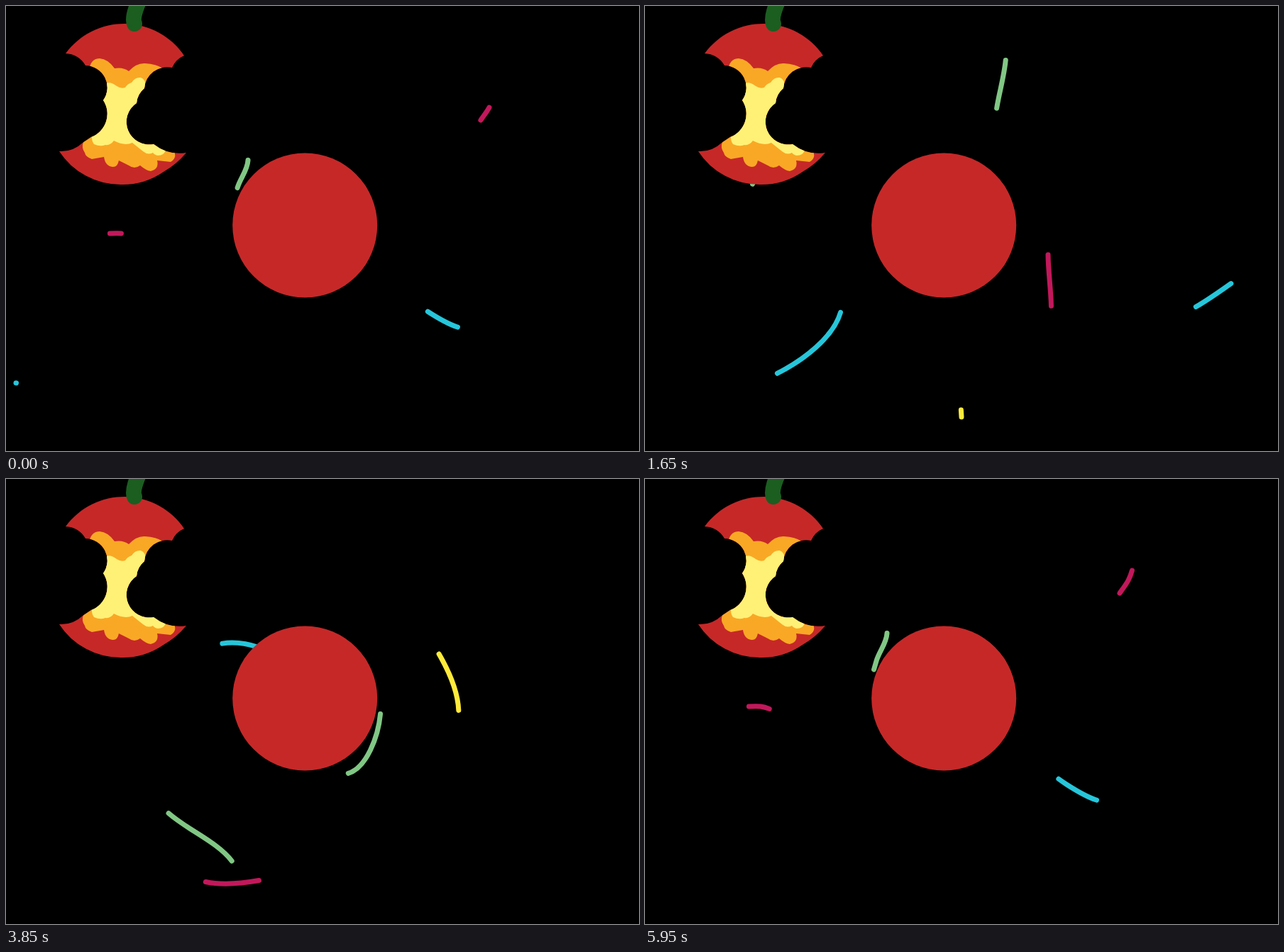
These frames come from a looping animation (892 by 628 pixels, 6000 ms). An HTML page:

```html
<!DOCTYPE html>
<html lang="en">
<head>
<meta charset="utf-8">
<title>Worms</title>
<style>
  html, body { margin: 0; width: 100%; height: 100%; overflow: hidden; background: #000; }
  svg { display: block; width: 100%; height: 100%; }
  #worms path { fill: none; stroke-width: 7; stroke-linecap: round; }
</style>
</head>
<body>
<svg viewBox="0 0 892 628">
  <defs>
    <clipPath id="core">
      <path d="M84,67 A102,102 0 0 1 251,70
        A32,32 0 0 0 234,87 A32,32 0 0 0 195,116 A31,31 0 0 0 184,137 A32,32 0 0 0 208,195 A59,59 0 0 0 254,207
        Q241,223 222,234 A102,102 0 0 1 162,252 A103,103 0 0 1 75,205
        A44,44 0 0 0 108,193 L120,185 A35,35 0 0 0 137,133 A31,31 0 0 0 112,84 A33,33 0 0 0 84,67Z"/>
    </clipPath>
  </defs>
  <rect width="892" height="628"/>
  <g id="worms"></g>
  <circle cx="421.2" cy="309.5" r="102" fill="#c62828"/>
  <ellipse cx="164" cy="138" rx="100" ry="112"/>
  <g clip-path="url(#core)">
    <rect x="70" y="20" width="190" height="236" fill="#c62828"/>
    <path fill="#f9a825" d="M112,90 L118,86 Q121,74 132,74 Q144,75 153,88 Q165,86 173,92 Q184,80 196,81
      Q212,82 221,88 L221,110 L236,203 Q242,214 232,220 L213,218 Q216,230 204,233 Q197,232 189,225
      Q181,231 173,225 L159,218 Q157,228 150,227 Q140,226 138,213 L121,216 Q112,213 111,207 Q106,200 109,192Z"/>
    <path fill="#fff176" d="M136,112 Q145,104 156,113 Q162,117 168,115 Q171,110 177,108 Q182,100 190,101
      Q196,103 197,112 L210,190 L225,203 Q223,211 214,211 Q209,210 207,207 Q200,211 193,205 L178,193
      Q167,198 152,190 Q147,197 140,196 Q133,199 124,195 Q120,190 121,180Z"/>
  </g>
  <path d="M181,25 Q177,17 187,-6" fill="none" stroke="#1b5e20" stroke-width="22" stroke-linecap="round"/>
</svg>
<script>
const LOOP = 6000, TICK = 50, STRIDE = 450, DOT = 0.5;
const layer = document.getElementById('worms');

// Each pose is [time, tail x, tail y, head x, head y]; without a head the worm is a dot.
const worms = [
  { color: '#26c6da', end: 8400, poses: [
    [0, 14, 532], [950, 84, 540, 168, 527], [2350, 275, 401, 234, 350], [3200, 233, 268, 289, 236],
    [5300, 505, 347, 559, 404], [6000, 594, 431, 636, 453], [6950, 699, 458, 740, 443], [8350, 880, 354]] },
  { color: '#c2185b', end: 13300, poses: [
    [5000, 662, 19], [5300, 662, 19, 677, 47], [6000, 681, 143, 669, 161], [6950, 603, 262, 581, 292],
    [8350, 550, 492, 539, 501], [9200, 431, 551, 409, 556], [10500, 247, 553, 215, 518],
    [11300, 204, 407, 216, 384], [12000, 163, 321, 147, 321], [12950, 62, 363, 24, 363], [13300, 5, 361]] },
  { color: '#ffeb3b', end: 5900, poses: [
    [1600, 446, 580], [2350, 442, 511, 442, 487], [3200, 577, 388, 618, 372], [4500, 576, 199, 553, 177],
    [5300, 407, 119, 368, 87], [5900, 232, 72, 180, 70]] },
  { color: '#81c784', end: 10850, poses: [
    [700, 503, 23], [950, 503, 23, 508, 49], [2350, 494, 156, 489, 208], [3200, 508, 260, 528, 324],
    [4500, 469, 416, 425, 380], [5300, 340, 362, 317, 317], [6000, 326, 257, 341, 218],
    [6950, 255, 150, 200, 150], [8350, 157, 238, 132, 324], [9200, 161, 403, 224, 467],
    [10500, 330, 568, 325, 614], [10800, 325, 614]] }
];

const clamp = v => Math.min(1, Math.max(0, v));
const mix = (a, b, k) => a + (b - a) * k;
const distance = (p, q) => Math.hypot(q[0] - p[0], q[1] - p[1]);

// Direction of the trail at point i; the shorter neighbouring segment weighs more.
function tangent(points, i) {
  let x = 0, y = 0;
  for (const [p, q] of [[points[i - 1], points[i]], [points[i], points[i + 1]]]) {
    if (!p || !q) continue;
    const weight = 1 / (distance(p, q) ** 2 || 1);
    x += (q[0] - p[0]) * weight;
    y += (q[1] - p[1]) * weight;
  }
  const size = Math.hypot(x, y) || 1;
  return [x / size, y / size];
}

// Joins all poses into one smooth trail and notes how far along it each pose lies.
function layTrail(worm) {
  const path = document.createElementNS('http://www.w3.org/2000/svg', 'path');
  path.setAttribute('stroke', worm.color);
  const points = worm.poses.flatMap(([, ...xy]) => xy.length > 2 ? [xy.slice(0, 2), xy.slice(2)] : [xy]);
  const lengths = [0];
  let d = `M${points[0]}`;
  for (let i = 1; i < points.length; i++) {
    const p = points[i - 1], q = points[i];
    const u = tangent(points, i - 1), v = tangent(points, i);
    const reach = distance(p, q) / 3;
    d += `C${p[0] + u[0] * reach},${p[1] + u[1] * reach} ${q[0] - v[0] * reach},${q[1] - v[1] * reach} ${q}`;
    path.setAttribute('d', d);
    lengths.push(path.getTotalLength());
  }
  worm.total = lengths.at(-1);
  worm.keys = worm.poses.map(pose => {
    const tail = lengths.shift();
    return { time: pose[0], tail, head: pose.length > 3 ? lengths.shift() : tail };
  });
  // A life may span several loops, so several of the same kind can be alive at once.
  worm.copies = Array.from({ length: Math.ceil(worm.end / LOOP) }, () => path.cloneNode());
  layer.append(...worm.copies);
}

// In every stride the head stretches forward first, then the tail catches up.
function crawl(keys, age) {
  const i = Math.max(1, keys.findIndex(key => age < key.time));
  const [from, to] = age < keys.at(-1).time ? [keys[i - 1], keys[i]] : keys.slice(-2);
  const span = to.time - from.time;
  const strides = Math.max(1, Math.round(span / STRIDE));
  const progress = clamp((age - from.time) / span) * strides;
  const done = Math.floor(progress), part = progress - done;
  const lead = (done + clamp(part * 1.6)) / strides;
  const lag = (done + clamp(part * 1.6 - 0.6)) / strides;
  return [mix(from.tail, to.tail, lag), mix(from.head, to.head, lead)];
}

function draw(time) {
  for (const { keys, copies, end, total } of worms) {
    copies.forEach((path, k) => {
      const age = time + k * LOOP;
      const alive = age >= keys[0].time && age < end;
      path.style.display = alive ? '' : 'none';
      if (!alive) return;
      const [tail, head] = crawl(keys, age);
      const from = Math.min(tail, total - DOT);
      path.setAttribute('stroke-dasharray', `${Math.max(DOT, head - from)} 9999`);
      path.setAttribute('stroke-dashoffset', -from);
    });
  }
}

worms.forEach(layTrail);
const start = performance.now();
function frame() {
  const time = (performance.now() - start) % LOOP;
  draw(Math.floor(time / TICK) * TICK);
  requestAnimationFrame(frame);
}
frame();
</script>
</body>
</html>
```
